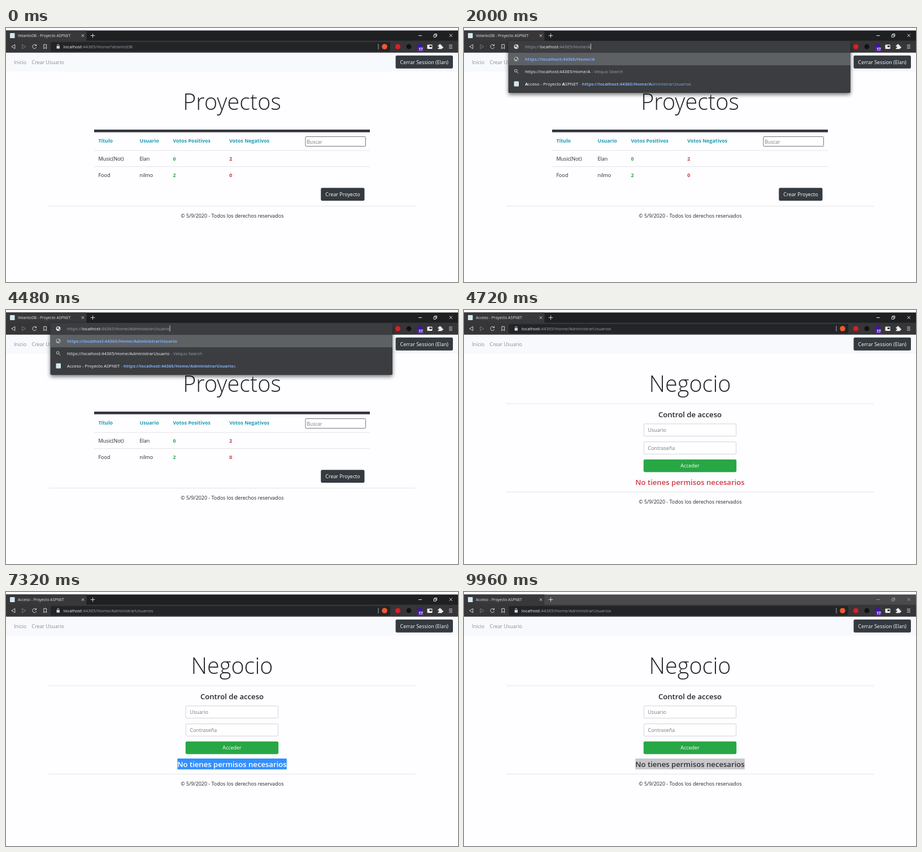
These frames come from a looping animation (800 by 450 pixels, 10000 ms). An HTML page:

```html
<!DOCTYPE html>
<html lang="es">
<head>
<meta charset="utf-8">
<title>Proyecto ASPNET</title>
<style>
  html, body { margin: 0; width: 100%; height: 100%; overflow: hidden; background: #fefdff; }
  svg { display: block; width: 800px; height: 450px; }
  text { font: 8.93px "Open Sans", "Noto Sans", sans-serif; fill: #212529; white-space: pre; }
  .mid { text-anchor: middle; }
  .light { fill: #fff; }
  .nav { fill: #8b8d90; }
  .hint { fill: #757b81; }
  .display { font-size: 39.6px; font-weight: 300; text-anchor: middle; }
  .h4 { font-size: 13.15px; font-weight: 600; text-anchor: middle; }
  .head, .yes, .no { font-size: 8.8px; font-weight: 700; }
  .head { fill: #1f9db4; }
  .yes { fill: #28a745; }
  .no { fill: #d0343f; }
  .tab { font-size: 6.8px; fill: #e4e5e7; }
  .url { font-size: 7.75px; fill: #9aa0a6; }
  .white { fill: #f1f3f4; }
  .blue { fill: #7fabf2; }
  .bold { font-weight: 700; }
  .dark { fill: #343a40; }
  .rule { stroke: #e4e4e8; }
  .field { fill: #fff; stroke: #ced4da; }
  .icon { fill: none; stroke: #d5d6d8; stroke-width: 1; }
</style>
</head>
<body>
<svg viewBox="0 0 800 450">
  <defs>
    <filter id="shadow" x="-5%" y="-20%" width="110%" height="150%">
      <feDropShadow dx="0" dy="3" stdDeviation="3.5" flood-color="#000" flood-opacity=".55"/>
    </filter>
    <clipPath id="picked"><rect id="pickedArea" y="290" height="30"/></clipPath>
    <g id="globe">
      <circle r="4"/>
      <path d="M-3-1.5L0-3 1-1-1 1zM1 0L3 .5 1.5 3z" fill="#3b3d41"/>
    </g>
    <rect id="favicon" x="-4" y="-4.5" width="8.5" height="9" rx="1" fill="#d6e6ef"/>
  </defs>

  <!-- page -->
  <rect y="44" width="800" height="33" fill="#f7f9fc"/>
  <text class="nav" x="14" y="64">Inicio</text>
  <text class="nav" x="45.5" y="64">Crear Usuario</text>
  <rect class="dark" x="689.6" y="48.8" width="101.4" height="23" rx="2.4"/>
  <text class="light mid" x="740.3" y="64">Cerrar Session (Elan)</text>

  <g id="projects">
    <text class="display" x="400" y="145">Proyectos</text>
    <rect x="156" y="180" width="488" height="4.7" fill="#34363f"/>
    <text class="head" x="163.5" y="202.8">Título</text>
    <text class="head" x="236.5" y="202.8">Usuario</text>
    <text class="head" x="295.5" y="202.8">Votos Positivos</text>
    <text class="head" x="395.3" y="202.8">Votos Negativos</text>
    <rect x="530" y="192.5" width="106.5" height="17" rx="1.2" fill="#fff" stroke="#77777b"/>
    <text class="hint" x="532.3" y="204.6" style="font-size:8.6px">Buscar</text>
    <path class="rule" d="M156 217H644M156 245.6H644"/>
    <text x="163.5" y="235">Music(Not)</text>
    <text x="236.5" y="235">Elan</text>
    <text class="yes" x="295.5" y="235">0</text>
    <text class="no" x="395.3" y="235">2</text>
    <text x="163.5" y="263.8">Food</text>
    <text x="236.5" y="263.8">nilmo</text>
    <text class="yes" x="295.5" y="263.8">2</text>
    <text class="no" x="395.3" y="263.8">0</text>
    <rect class="dark" x="557.3" y="283.3" width="77.2" height="22.8" rx="2.4"/>
    <text class="light mid" x="596" y="298.4">Crear Proyecto</text>
  </g>

  <g id="access">
    <text class="display" x="400" y="145">Negocio</text>
    <path class="rule" d="M75 166H725"/>
    <text class="h4" x="400" y="189.7">Control de acceso</text>
    <rect class="field" x="318.3" y="201.8" width="163.4" height="21.6" rx="2.4"/>
    <text class="hint" x="325.5" y="216.2">Usuario</text>
    <rect class="field" x="318.3" y="233.6" width="163.4" height="21.6" rx="2.4"/>
    <text class="hint" x="325.5" y="248">Contraseña</text>
    <rect x="317.8" y="264.8" width="164.4" height="22.4" rx="2.4" fill="#28a745"/>
    <text class="light mid" x="400" y="279.4">Acceder</text>
    <text class="h4" id="message" x="400" y="310.4" style="fill:#cf3b46">No tienes permisos necesarios</text>
    <g clip-path="url(#picked)">
      <rect id="highlight" x="303.4" y="295" width="193.4" height="19.3"/>
      <text class="h4" id="pickedText" x="400" y="310.4">No tienes permisos necesarios</text>
    </g>
  </g>

  <g id="footer">
    <path class="rule" d="M75 315.6H725"/>
    <text class="mid" x="400.3" y="335.6">© 5/9/2020 - Todos los derechos reservados</text>
  </g>

  <!-- browser frame -->
  <rect id="titleBar" y="4.4" width="800" height="18.6"/>
  <rect y="4.4" width="142.5" height="18.6" fill="#38383b"/>
  <rect y="22.5" width="800" height="21.2" fill="#363538"/>
  <use href="#favicon" x="11" y="13.5"/>
  <text class="tab" id="tabTitle" x="21" y="15.9"></text>
  <path class="icon" d="M133.8 11.3l4.4 4.4m0-4.4l-4.4 4.4M149.7 13.5h7.6m-3.8-3.8v7.6"/>
  <path class="icon" id="windowButtons" d="M730 13.5h6M757 12.2h4v4h-4zM758.5 12v-1.5h4v4H761M784.8 10.8l5 5m0-5l-5 5"/>
  <path class="icon" d="M15.8 29.3v7.4L9.8 33z"/>
  <path class="icon" d="M28.8 29.3v7.4l6-3.7z" style="stroke:#77787a"/>
  <path class="icon" d="M53 30.6a3.5 3.5 0 1 0 .7 3.4M53.6 28.8v2.6H51"/>
  <path class="icon" d="M66.8 29.3h4.8v7.4l-2.4-1.9-2.4 1.9z"/>
  <rect x="79.2" y="25" width="601" height="16.5" rx="2" fill="#232427"/>
  <g id="address">
    <rect x="89.6" y="32" width="5.4" height="4.5" rx=".6" fill="#d5d6d8"/>
    <path class="icon" d="M90.8 32v-1.4a1.5 1.5 0 0 1 3 0V32"/>
    <text class="url" x="101.8" y="35.9"><tspan class="white">localhost</tspan><tspan id="path"></tspan></text>
    <path d="M659 28v10" stroke="#a5a6a8"/>
    <circle cx="670" cy="33" r="4.8" fill="#f1582c"/>
  </g>
  <circle cx="693.5" cy="33" r="4.6" fill="#d91f26"/>
  <circle cx="713" cy="33" r="4.4" fill="#111"/>
  <circle cx="732" cy="32" r="4.6" fill="#3b1a9c"/>
  <rect x="729" y="33.5" width="10" height="8" rx="1.5" fill="#5a2ca8"/>
  <text class="light mid bold" x="734" y="40" style="font-size:6.2px">17</text>
  <rect x="745.5" y="29.5" width="9" height="7.5" rx="1" fill="#f0f0f0"/>
  <rect x="749.5" y="31" width="4" height="3" fill="#333"/>
  <path d="M764.5 30.5h2.2a1.5 1.5 0 1 1 2.8 0h2.2v2.4a1.5 1.5 0 1 1 0 2.6v1.8h-7.2v-2a1.4 1.4 0 1 0 0-2.5z" fill="#eee"/>
  <path class="icon" d="M784 30.2h6M784 33h6M784 35.8h6"/>

  <!-- focused address bar and suggestions -->
  <g id="popup">
    <rect id="popupBox" x="78.5" y="23" width="605.5" rx="2" fill="#3b3d41" filter="url(#shadow)"/>
    <use href="#globe" x="92.5" y="33" fill="#dfe1e5"/>
    <text class="url" id="typedUrl" x="108" y="35.9"><tspan>https://</tspan><tspan class="white">localhost</tspan><tspan id="typedPath"></tspan></text>
    <rect id="caret" y="27.5" width=".8" height="10.5" fill="#e8eaed"/>
    <g id="suggestions">
      <rect x="78.5" y="44" width="605.5" height="22" fill="#5e6164"/>
      <use href="#globe" x="92.5" y="55" fill="#a9adb2"/>
      <text class="url blue bold" id="row1" x="108" y="57.8"></text>
      <circle class="icon" cx="91.7" cy="75.8" r="2.3"/>
      <path class="icon" d="M93.4 77.5l2.8 2.8"/>
      <text class="url" x="108" y="79.9"><tspan class="white" id="row2"></tspan> - Velquo Search</text>
      <use href="#favicon" x="92.5" y="99"/>
      <text class="url" x="108" y="102"><tspan class="white"><tspan class="initial">A</tspan>cceso - Proyecto <tspan class="initial">A</tspan>SPNET</tspan> - <tspan class="blue bold" id="matched"></tspan><tspan class="blue" id="unmatched"></tspan></text>
    </g>
  </g>
</svg>
<script>
  const LOOP = 10000;
  const FOCUS = 1560, CLEARED = 1720, TYPE_START = 1928, KEY_GAP = 144;
  const ENTER = 4620, LOADED = 4720;
  const DRAG_START = 5840, DRAG_END = 6680, BLUR = 8440;
  const HOST = ':44365/Home/', FIRST = 'VelantoDB', WORD = 'AdministrarUsuarios';
  const PREFIX = 'https://localhost' + HOST;

  const $ = id => document.getElementById(id);
  const show = (id, on) => $(id).style.display = on ? '' : 'none';
  const write = (id, value) => $(id).textContent = value;
  const clamp = (v, lo, hi) => Math.min(hi, Math.max(lo, v));

  function drawPopup(t) {
    const open = t >= FOCUS && t < ENTER;
    const listed = open && t >= CLEARED;
    show('popup', open);
    show('address', !open);
    if (!open) return;

    const count = clamp(Math.floor((t - TYPE_START) / KEY_GAP) + 1, 0, WORD.length);
    const typed = listed ? WORD.slice(0, count) : FIRST;
    show('suggestions', listed);
    $('popupBox').setAttribute('height', listed ? 92 : 21);
    write('typedPath', HOST + typed);
    $('caret').setAttribute('x', 108.2 + $('typedUrl').getComputedTextLength());
    for (const id of ['row1', 'row2', 'matched']) write(id, PREFIX + typed);
    write('unmatched', WORD.slice(count));
    for (const letter of document.querySelectorAll('.initial'))
      letter.classList.toggle('bold', count === 1);
  }

  function drawSelection(t) {
    const message = $('message');
    const total = message.textContent.length;
    const progress = clamp((t - DRAG_START) / (DRAG_END - DRAG_START), 0, 1);
    const count = Math.round(progress * total);
    const start = 400 - message.getComputedTextLength() / 2;
    const width = count === 0 ? 0
      : count === total ? 400
      : message.getSubStringLength(0, count) + start - 300;
    $('pickedArea').setAttribute('x', 300);
    $('pickedArea').setAttribute('width', width);
    $('highlight').setAttribute('fill', t < BLUR ? '#3390ff' : '#c8c7c9');
    $('pickedText').style.fill = t < BLUR ? '#fff' : '#323138';
  }

  function draw(t) {
    const loaded = t >= LOADED;
    show('projects', !loaded);
    show('access', loaded);
    $('footer').setAttribute('transform', `translate(0 ${loaded ? 7 : 0})`);
    write('tabTitle', (loaded ? 'Acceso' : FIRST) + ' - Proyecto ASPNET');
    write('path', HOST + (t >= ENTER ? WORD : FIRST));
    $('titleBar').setAttribute('fill', t < BLUR ? '#1f2022' : '#4a4a4c');
    $('windowButtons').style.stroke = t < BLUR ? '#e4e5e7' : '#97989a';
    drawPopup(t);
    if (loaded) drawSelection(t);
  }

  function tick() {
    draw(performance.now() % LOOP);
    requestAnimationFrame(tick);
  }
  tick();
</script>
</body>
</html>
```
